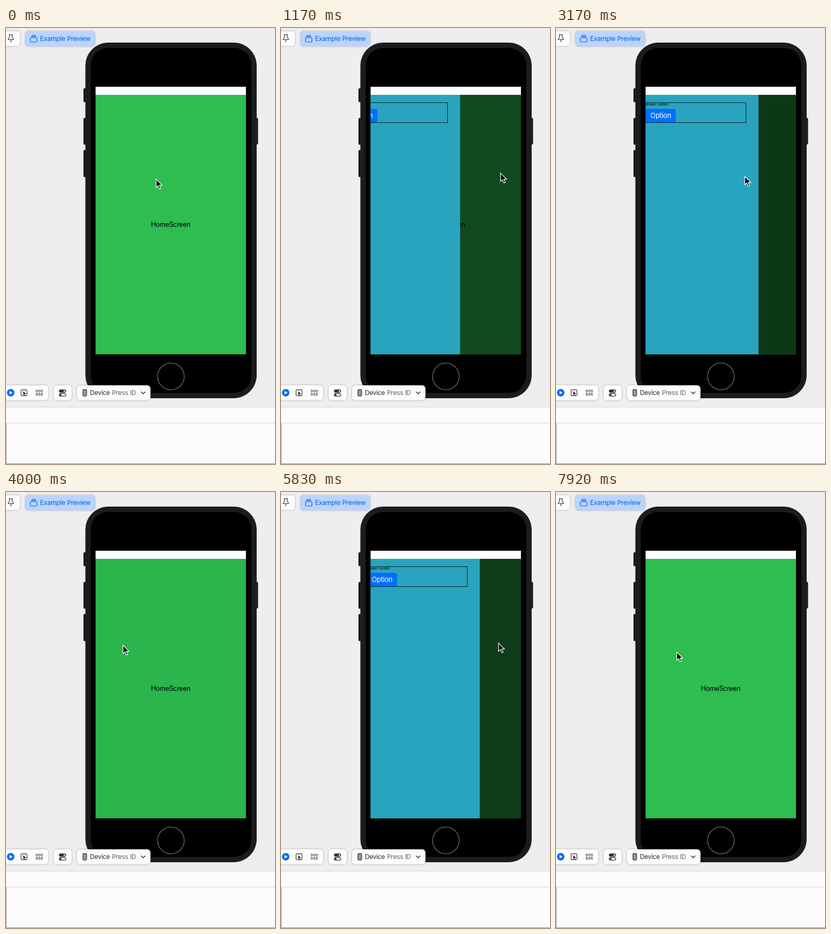
An HTML page that plays this animation: 500 by 809 pixels, repeating every 8 s.

```html
<!DOCTYPE html>
<html lang="en">
<head>
<meta charset="utf-8">
<title>Drawer preview</title>
<style>
  html, body { margin: 0; width: 100%; height: 100%; overflow: hidden; background: #efedf0; }
  svg { display: block; width: 100%; height: 100%; }
  text { font-family: Inter, "Open Sans", sans-serif; letter-spacing: -.022em; }
  .pill { fill: #fdfcfd; filter: drop-shadow(0 .5px 1.5px #0005); }
  .icon { fill: none; stroke: #343336; stroke-width: 1.2; stroke-linecap: round; stroke-linejoin: round; }
</style>
</head>
<body>
<svg viewBox="0 0 500 809">
  <defs>
    <clipPath id="screen"><rect x="166.5" y="124" width="279.5" height="481.5"/></clipPath>
    <rect id="cell" width="2.6" height="3.8" rx=".8"/>
    <g id="cells"><use href="#cell"/><use href="#cell" x="4.7"/><use href="#cell" x="9.4"/></g>
  </defs>
  <rect width="500" height="809" fill="#efedf0"/>

  <!-- Phone -->
  <g fill="#19191b">
    <rect x="144" y="112" width="6" height="25.5" rx="1.5"/>
    <rect x="144" y="167" width="6" height="49.5" rx="1.5"/>
    <rect x="144" y="226.5" width="6" height="50" rx="1.5"/>
    <rect x="463" y="167" width="5.5" height="49" rx="1.5"/>
  </g>
  <rect x="148" y="27.5" width="317.5" height="659" rx="42" fill="#1c1c1f" stroke="#252528"/>
  <rect x="157.5" y="37" width="298.5" height="640" rx="32"/>
  <circle cx="306.5" cy="646.5" r="24.8" fill="none" stroke="#6b6b6c" stroke-width="1.3"/>
  <rect x="166.5" y="109" width="279.5" height="15" fill="#fff"/>

  <!-- Screen -->
  <g clip-path="url(#screen)">
    <rect x="166" y="124" width="281" height="482" fill="#2dbd50"/>
    <text x="306.2" y="369.3" font-size="12.4" text-anchor="middle">HomeScreen</text>
    <rect id="shade" x="166" y="124" width="281" height="482"/>
    <g id="drawer">
      <rect x="166" y="124" width="210.3" height="482" fill="#29a4bf"/>
      <text x="166.5" y="144" font-size="6.2">drawer content</text>
      <rect x="167" y="150" width="55.5" height="25.5" rx="4" fill="#006fff"/>
      <text x="194.7" y="167.2" font-size="12.9" fill="#fff" text-anchor="middle">Option</text>
      <rect x="166.5" y="138.5" width="186.5" height="37" fill="none" stroke="#101c20"/>
    </g>
  </g>

  <!-- Top controls -->
  <rect class="pill" x="-12" y="6" width="38" height="27.5" rx="6"/>
  <path class="icon" d="M5.5 12.5H12.5M6.8 12.5L6.4 17.5Q4.2 19 4 21.5H14Q13.8 19 11.6 17.5L11.2 12.5M9 21.5V26"/>
  <rect class="pill" x="36" y="6" width="129.5" height="28" rx="6" style="fill:#bad4fc"/>
  <g class="icon" style="stroke:#0862df">
    <rect x="45.5" y="18" width="12" height="8" rx="1.8"/>
    <path d="M46.800 15.8H56.2M48.3 13.6H54.7"/>
  </g>
  <text x="63.3" y="24.3" font-size="12.15" fill="#0862df">Example Preview</text>

  <!-- Bottom controls -->
  <rect class="pill" x="-12" y="663" width="90.5" height="27.5" rx="6"/>
  <rect class="pill" x="88.5" y="663" width="33.5" height="27.5" rx="6"/>
  <rect class="pill" x="132" y="663" width="136.5" height="27.5" rx="6"/>
  <circle cx="8.7" cy="676.8" r="7" fill="#006cf5"/>
  <path d="M6.7 673.5V680.1L12.2 676.8Z" fill="#fff"/>
  <rect class="icon" x="28" y="671.3" width="11" height="11" rx="1.5"/>
  <path d="M32 673.7V681.2L33.8 679.6 35 682 36.2 681.4 35.1 679.1H37.3Z" fill="#343336"/>
  <g class="icon" style="stroke-width:.9">
    <use href="#cells" x="55.9" y="671.8"/>
    <use href="#cells" x="55.9" y="678"/>
  </g>
  <g class="icon">
    <rect x="99" y="671.3" width="12" height="4.8" rx="2.4" fill="#343336"/>
    <rect x="99" y="678.3" width="12" height="4.8" rx="2.4"/>
    <circle cx="108.5" cy="673.7" r="1.5" fill="#fff" stroke="none"/>
    <circle cx="101.5" cy="680.7" r="1.7" fill="#343336" stroke="none"/>
    <rect x="143" y="670.8" width="6.8" height="12" rx="1.3" fill="#99989b"/>
    <path d="M251.5 675.3L255 678.8 258.5 675.3" stroke-width="1.6"/>
  </g>
  <text x="156" y="681.2" font-size="11.9" fill="#29282b">Device</text>
  <text x="197" y="681.2" font-size="11.9" fill="#606063">Press ID</text>

  <!-- Lower panel -->
  <rect y="703" width="500" height="106" fill="#fdfbfe"/>
  <path d="M0 703.5H500M0 733H500" stroke="#d8d6d9"/>
  <path d="M.5 733V808.5H500" fill="none" stroke="#929194"/>

  <path id="pointer" d="M0 0V15.2L3.5 12 6.1 18 8.7 16.9 6.2 11.1H11Z" stroke="#fff" stroke-width="1.2"/>
</svg>
<script>
  const DURATION = 8000;
  const TRAVEL = 213; // the closed drawer rests just outside the screen

  // Pointer strokes, each easing on from where the previous one ended.
  const strokes = [
    { start: 0, end: 700, x: 240, y: 283 },
    { start: 880, end: 1240, x: 426, y: 268 },
    { start: 1700, end: 2900, x: 351, y: 275.5 },
    { start: 3400, end: 3850, x: 217.5, y: 284.5 },
    { start: 4300, end: 5000, x: 201, y: 288 },
    { start: 5200, end: 6020, x: 436, y: 279 },
    { start: 6400, end: 6920, x: 225, y: 300 },
    { start: 7100, end: 7700, x: 224.5, y: 297 }
  ];

  const ease = (time, start, end) => {
    const u = Math.min(1, Math.max(0, (time - start) / (end - start)));
    return u * u * (3 - 2 * u);
  };

  // Share of the drawer that is out: two swipes open it, two close it.
  const openness = time =>
    ease(time, 880, 1290) - ease(time, 3400, 4040) + ease(time, 5200, 5907) - ease(time, 6400, 6920);

  const pointerAt = time => strokes.reduce((at, { start, end, x, y }) => {
    const u = ease(time, start, end);
    return { x: at.x + (x - at.x) * u, y: at.y + (y - at.y) * u };
  }, { x: 279, y: 280.5 });

  const [drawer, shade, pointer] = ["drawer", "shade", "pointer"].map(id => document.getElementById(id));
  const place = (element, x, y) => element.setAttribute("transform", `translate(${x} ${y})`);

  function draw(time) {
    const open = openness(time);
    const { x, y } = pointerAt(time);
    place(drawer, (open - 1) * TRAVEL, 0);
    shade.setAttribute("opacity", .7 * Math.max(0, open) ** .62);
    place(pointer, x, y);
  }

  const origin = performance.now();
  function tick() {
    draw((performance.now() - origin) % DURATION);
    requestAnimationFrame(tick);
  }
  tick();
</script>
</body>
</html>
```
